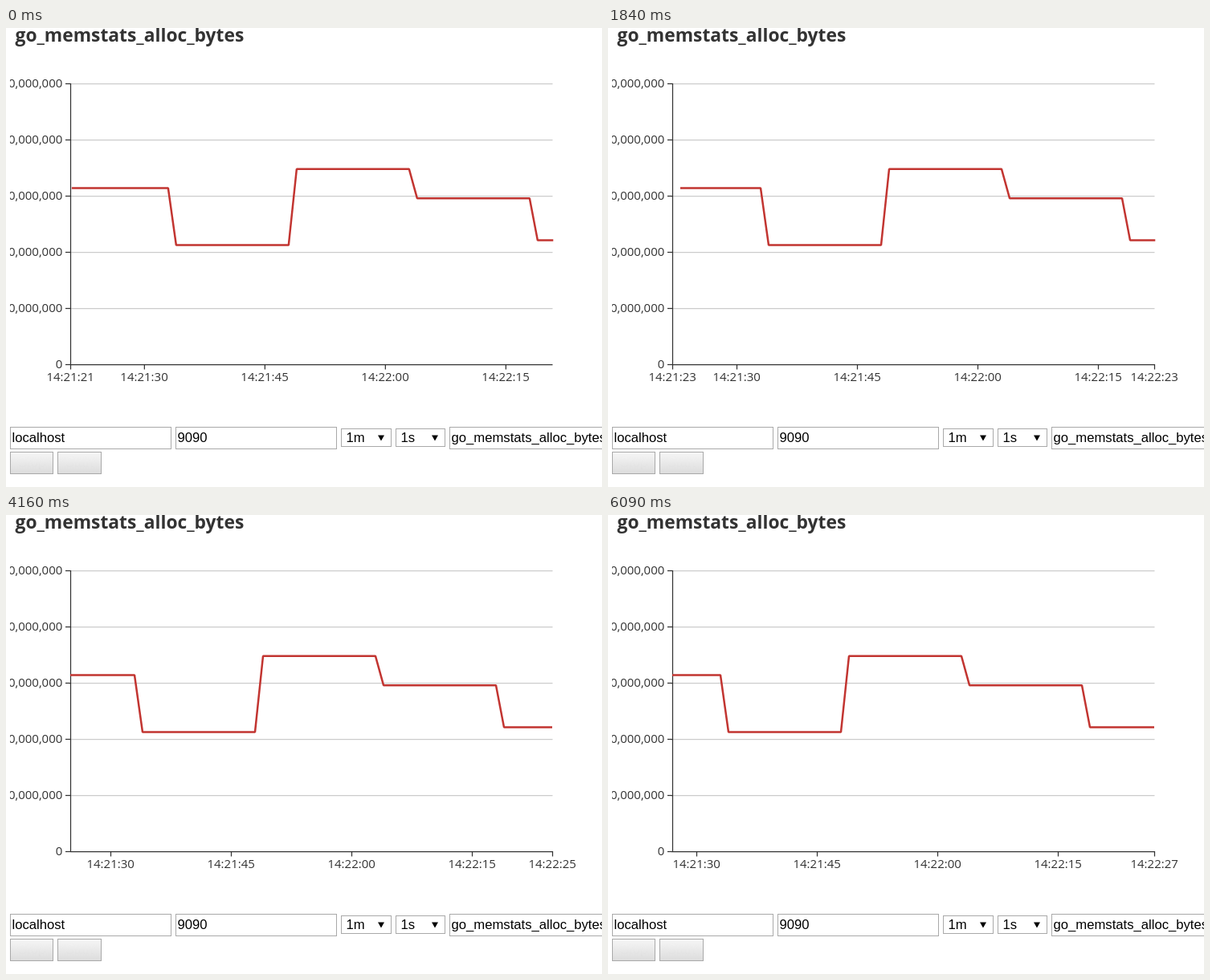
An HTML page that plays this animation: 742 by 572 pixels, repeating every 6.49 s.

```html
<!DOCTYPE html>
<html lang="en">
<head>
<meta charset="utf-8">
<title>Memory chart</title>
<style>
  html, body { margin: 0; width: 100%; height: 100%; overflow: hidden; background: #fff; }
  svg { display: block; }
  text { font: 15px "Open Sans", "Noto Sans", sans-serif; fill: #333; }
  .title { font-size: 22.8px; font-weight: bold; }
  .mid { text-anchor: middle; }
  .end { text-anchor: end; }
  .form text { font: 16.67px "Liberation Sans", Arial, sans-serif; fill: #000; }
  .form .off { fill: #808080; }
  .form rect { fill: #fff; stroke: #a9a9a9; }
  .form .button { fill: url(#face); }
  .axis { stroke: #333; stroke-width: 1.25; }
  .grid { stroke: #ccc; stroke-width: 1.25; }
  .series { fill: none; stroke: #c23531; stroke-width: 2.5; stroke-linejoin: bevel; }
</style>
</head>
<body>
<svg width="742" height="572" viewBox="0 0 742 572">
  <defs>
    <linearGradient id="face" x2="0" y2="1">
      <stop stop-color="#f6f6f6"/><stop offset="1" stop-color="#dcdcdc"/>
    </linearGradient>
    <clipPath id="plot"><rect id="window" y="60" height="370"/></clipPath>
  </defs>
  <text class="title" x="11.5" y="17">go_memstats_alloc_bytes</text>
  <g id="rows"></g>
  <path class="axis" d="M80.5 69V420M80 419.5H680.5"/>
  <g id="ticks"></g>
  <g id="first"><path class="axis" d="M80.5 419V425.5"/><text class="mid" x="80.2" y="440"></text></g>
  <g id="last"><path class="axis" d="M680.5 419V425.5"/><text class="mid" x="680.2" y="440"></text></g>
  <g clip-path="url(#plot)"><path id="line" class="series"/></g>
  <g id="form" class="form"></g>
</svg>
<script>
const LOOP = 6490, LEFT = 80, RIGHT = 680, STEP = 10, FIRST = 21, SPAN = 60;
const $ = id => document.getElementById(id);

// Seconds are counted from 14:21:00.
const clock = s => `14:${21 + Math.floor(s / 60)}:${String(s % 60).padStart(2, '0')}`;
const xOf = s => LEFT + (s - FIRST) * STEP;

// Each level holds from one second to another.
const levels = [[0, 33, 199.5], [34, 48, 270.5], [49, 63, 175.8], [64, 78, 212.2], [79, 99, 264.5]];
$('line').setAttribute('d', 'M' + levels.map(([a, b, y]) => `${xOf(a)} ${y}L${xOf(b)} ${y}`).join('L'));

let rows = '', names = '';
for (let i = 0; i <= 5; i++) {
  const y = 419.5 - i * 70;
  if (i) rows += `<path class="grid" d="M81 ${y}H680.5"/>`;
  rows += `<path class="axis" d="M74 ${y}H80"/>`;
  names += `<text class="end" x="65.3" y="${y + 4}">${i ? i + '0,000,000' : 0}</text>`;
}
$('rows').innerHTML = rows + `<svg x="5" width="70" height="440">${names}</svg>`;

$('ticks').innerHTML = [30, 45, 60, 75].map(s =>
  `<path class="axis" d="M${xOf(s) + 0.5} 419V425.5"/><text class="mid" x="${xOf(s) + 0.2}" y="440">${clock(s)}</text>`).join('');

const box = (x, y, w, h, tx, label, cls = '') =>
  `<rect class="${cls}" x="${x + 0.5}" y="${y + 0.5}" width="${w - 1}" height="${h - 1}"/>` +
  `<text class="${cls}" x="${tx}" y="${y < 528 ? 516 : 547}">${label}</text>`;
const select = (x, w, label) =>
  box(x, 499, w, 23, x + 6.5, label) + `<path d="M${x + w - 17} 507.5h8l-4 7z"/>`;
$('form').innerHTML =
  box(5, 497, 201, 28, 7.5, 'localhost') +
  box(211, 497, 201, 28, 213.5, '9090') +
  select(417, 63, '1m') + select(485, 62, '1s') +
  box(552, 497, 201, 28, 554.5, 'go_memstats_alloc_bytes') +
  box(5, 528, 54, 28, 15, 'Stop', 'button') +
  box(64, 528, 55, 28, 74, 'Start', 'button off').replace('button off', 'button');

// Start, end, number of steps, progress already made at the start.
const moves = [
  [5, 200, 3, 0.43], [830, 1130, 4, 0], [1840, 2160, 4, 0], [2840, 3150, 4, 0],
  [3850, 4160, 4, 0], [4860, 5090, 3, 0.25], [5800, 6090, 4, 0]
];

function edge(id, second, gap) {
  $(id).style.display = gap > 60 ? '' : 'none';
  $(id).querySelector('text').textContent = clock(second);
}

function draw(now) {
  const t = now % LOOP;
  const index = Math.max(0, moves.findLastIndex(m => t >= m[0]));
  const [start, end, steps, done] = moves[index];
  const k = Math.min(steps, Math.max(0, Math.floor((t - start) / (end - start) * steps + 1e-6)));
  const p = done + (1 - done) * k / steps;
  const rest = STEP * (1 - p) ** 3;
  const shift = `translate(${rest - index * STEP})`;
  const from = FIRST + index;

  $('ticks').setAttribute('transform', shift);
  $('line').setAttribute('transform', shift);
  $('window').setAttribute('x', LEFT + rest);
  $('window').setAttribute('width', Math.min(RIGHT + rest, RIGHT + 1.3) - LEFT - rest);
  edge('first', from, (30 - from) * STEP);
  edge('last', from + SPAN, (from + SPAN - 75) * STEP);
  requestAnimationFrame(draw);
}
draw(performance.now());
</script>
</body>
</html>
```
